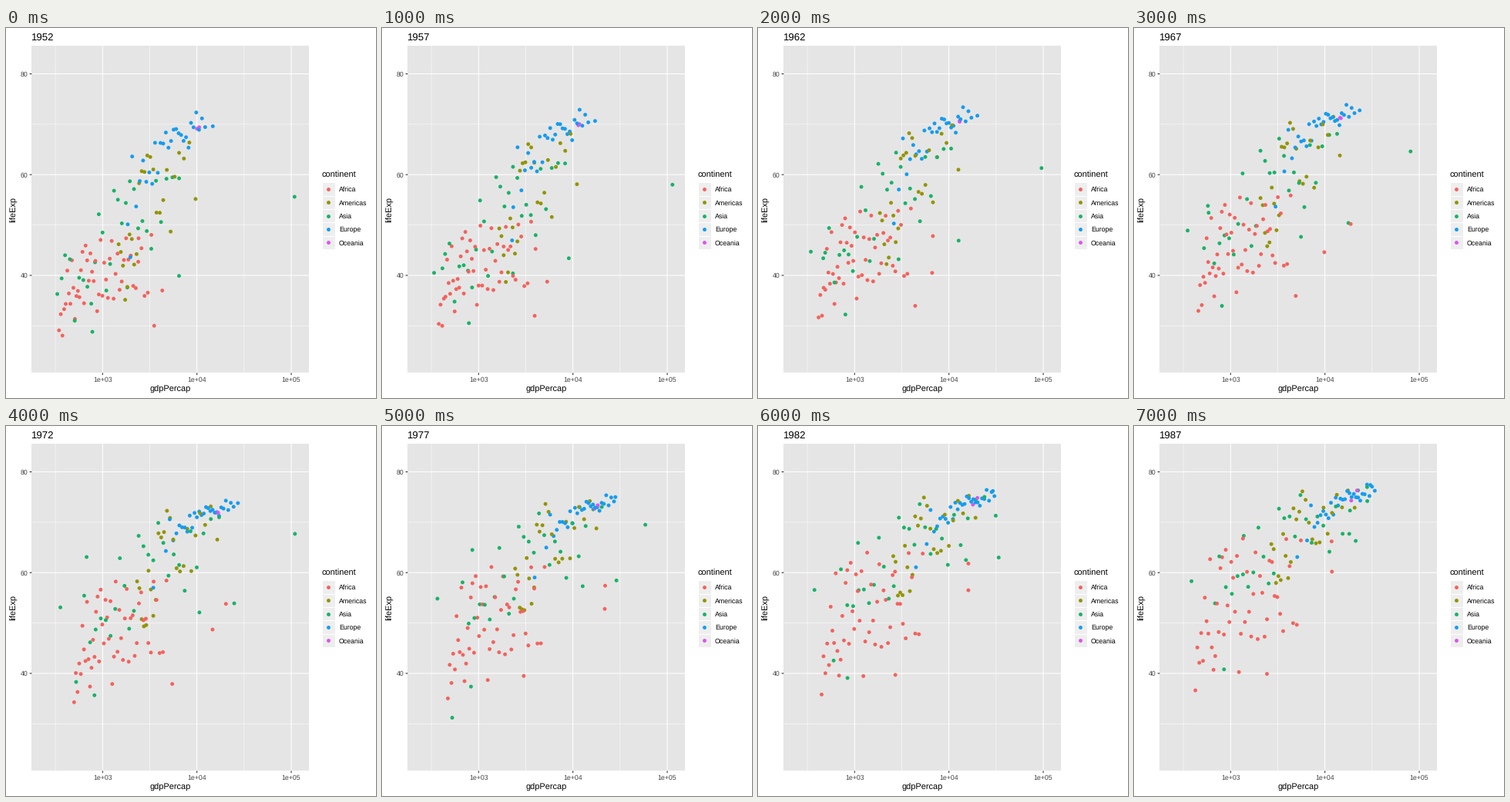
Write a matplotlib script that moves like this. It is 480 px wide and 480 px high and loops after 8000 ms.

```python
import numpy as np
import matplotlib.pyplot as plt
from matplotlib.animation import FuncAnimation
from matplotlib.patches import Rectangle

SIZE = 480
PT = 0.9  # points per pixel at 80 dpi
LEFT, RIGHT, TOP, BOTTOM = 33.4, 393.2, 23.2, 447.4
DOT = 4.9
COLORS = {"Africa": "#F3625D", "Americas": "#929400", "Asia": "#18B268",
          "Europe": "#149CF0", "Oceania": "#DC54EF"}
TREND_YEARS = (1952, 1972, 1987)
rng = np.random.default_rng(7)


def px(log_gdp):
    return LEFT + (log_gdp - 2.249) * (RIGHT - LEFT) / 2.940


def py(life):
    return TOP + (85.553 - life) * (BOTTOM - TOP) / 64.904


def spread(n):
    """Evenly filled bell-like values of unit spread, in random order."""
    q = (2 * rng.permutation(n) + 1) / n - 1
    return 1.6 * q + 0.2 * q ** 5


def skew(u, amount):
    return u + amount * (u * u - 1)


class Cloud:
    """A continent's dots, spread around a trend in log income and life."""

    def __init__(self, name, n, gdp, gdp_sd, life, life_sd, fit, lean, sag):
        self.colors = [COLORS[name]] * n
        self.trend = gdp, gdp_sd, life, life_sd
        self.rich, self.own, self.later = spread(n), spread(n), spread(n)
        self.fit, self.lean, self.sag = fit, lean, sag

    def at(self, year):
        gdp, gdp_sd, life, life_sd = (np.interp(year, TREND_YEARS, row)
                                      for row in self.trend)
        turn = 0.5 * (year - 1952) / 35
        own = np.cos(turn) * self.own + np.sin(turn) * self.later
        health = self.fit * self.rich + np.sqrt(1 - self.fit ** 2) * own
        return (gdp + gdp_sd * skew(self.rich, self.lean),
                life + life_sd * skew(health, self.sag))


class Track:
    """One far-out dot that passes through (year, income, life) points."""

    def __init__(self, name, *points):
        self.colors = [COLORS[name]]
        self.years, gdp, self.life = zip(*points)
        self.gdp = np.log10(gdp)

    def at(self, year):
        return ([np.interp(year, self.years, self.gdp)],
                [np.interp(year, self.years, self.life)])


parts = [
    Cloud("Africa", 49, (2.97, 3.13, 3.12), (0.28, 0.28, 0.32),
          (39.3, 47.6, 53.3), (5.1, 6.2, 7.6), 0.5, 0.1, 0.02),
    Cloud("Americas", 25, (3.51, 3.72, 3.80), (0.24, 0.25, 0.26),
          (53.3, 62.4, 68.1), (9.0, 7.3, 5.6), 0.7, 0.15, -0.1),
    Cloud("Asia", 26, (3.20, 3.48, 3.62), (0.34, 0.42, 0.46),
          (48.5, 59.5, 66.4), (8.4, 7.8, 6.6), 0.75, 0.05, -0.05),
    Cloud("Europe", 28, (3.70, 4.05, 4.19), (0.24, 0.21, 0.21),
          (65.0, 71.0, 73.8), (4.9, 2.1, 2.3), 0.85, -0.05, -0.15),
    Track("Africa", (1952, 2388, 42.7), (1962, 6757, 47.8), (1967, 18773, 50.2),
          (1977, 21951, 57.4), (1987, 11771, 66.2)),
    Track("Africa", (1952, 4293, 37), (1962, 6631, 40.5), (1977, 21746, 52.8),
          (1987, 11864, 60.2)),
    Track("Africa", (1952, 3521, 30), (1972, 5473, 37.9), (1977, 3009, 39.5),
          (1987, 2430, 39.9)),
    Track("Asia", (1952, 108382, 55.6), (1957, 113523, 58), (1967, 80895, 64.6),
          (1972, 109348, 67.7), (1982, 31354, 71.3), (1987, 28118, 74.2)),
    Track("Asia", (1952, 6460, 39.9), (1972, 24838, 53.9), (1982, 33693, 63),
          (1987, 21198, 66.3)),
    Track("Asia", (1952, 1828, 37.6), (1962, 2925, 43.2), (1972, 10618, 52.1),
          (1987, 18115, 67.7)),
    Track("Asia", (1952, 368, 39.4), (1967, 523, 45.4), (1977, 525, 31.2),
          (1987, 684, 53.9)),
    Track("Asia", (1952, 400, 44), (1962, 488, 44.5), (1972, 677, 63.1),
          (1987, 1379, 67.3)),
    Track("Asia", (1952, 331, 36.3), (1972, 357, 53.1), (1987, 385, 58.3)),
    Track("Asia", (1952, 779, 28.8), (1987, 852, 40.8)),
    Track("Europe", (1952, 1969, 43.6), (1972, 3451, 57), (1987, 5089, 63.1)),
    Track("Europe", (1952, 14734, 69.6), (1972, 27195, 73.8), (1987, 30282, 77.4)),
    Track("Oceania", (1952, 10040, 69.1), (1972, 16789, 71.9), (1987, 21889, 76.3)),
    Track("Oceania", (1952, 10557, 69.4), (1972, 16046, 71.9), (1987, 19007, 74.3)),
]
colors = np.concatenate([part.colors for part in parts])
# Mix the continents so that no colour always lies on top.
order = rng.permutation(len(colors))

plt.rcParams["font.family"] = "Liberation Sans"
plt.rcParams["text.hinting"] = "none"
fig = plt.figure(figsize=(6, 6), dpi=80, facecolor="white")
ax = fig.add_axes([0, 0, 1, 1])
ax.set(xlim=(0, SIZE), ylim=(SIZE, 0))
ax.axis("off")


def box(x, y, w, h, fill, edge="none"):
    ax.add_patch(Rectangle((x, y), w, h, fc=fill, ec=edge, lw=1.07 * PT, zorder=1))


def line(xs, ys, color="white", width=1.07):
    ax.plot(xs, ys, color=color, lw=width * PT, zorder=2,
            solid_capstyle="butt", snap=False)


def text(x, y, s, size, color="black", **kw):
    return ax.text(x, y, s, fontsize=size * PT, color=color, **kw)


def scatter(x, y, color):
    return ax.scatter(x, y, s=(DOT * PT) ** 2, c=color, lw=0, zorder=3)


box(LEFT, TOP, RIGHT - LEFT, BOTTOM - TOP, "#E5E5E5")
for v in (2.5, 3.5, 4.5):
    line([px(v)] * 2, [TOP, BOTTOM], width=0.53)
for v in (30, 50, 70):
    line([LEFT, RIGHT], [py(v)] * 2, width=0.53)
for v in (3, 4, 5):
    line([px(v)] * 2, [TOP, BOTTOM])
    line([px(v)] * 2, [BOTTOM, BOTTOM + 2.75], "#2B2B2B")
    text(px(v), 459, f"1e+0{v}", 8.8, "#444444", ha="center")
for v in (40, 60, 80):
    line([LEFT, RIGHT], [py(v)] * 2)
    line([LEFT - 2.75, LEFT], [py(v)] * 2, "#2B2B2B")
    text(28.4, py(v) + 3.2, v, 8.8, "#444444", ha="right")

text((LEFT + RIGHT) / 2, 472, "gdpPercap", 11, ha="center")
text(13, (TOP + BOTTOM) / 2, "lifeExp", 11, rotation=90, ha="center",
     va="baseline", rotation_mode="anchor")
title = text(LEFT, 15.6, "1952", 13.2)

text(409.5, 194, "continent", 11)
for i, (name, color) in enumerate(COLORS.items()):
    y = 209.1 + 17.28 * i
    box(409.6, y - 8.64, 17.28, 17.28, "#EEEEEE", "white")
    scatter([418.2], [y], color)
    text(432, y + 3.2, name, 8.8)

dots = scatter(np.zeros(len(order)), np.zeros(len(order)), colors[order])


def draw(frame):
    year = 1952 + 5 * frame
    title.set_text(str(year))
    gdp, life = np.hstack([part.at(year) for part in parts])
    dots.set_offsets(np.column_stack([px(gdp), py(life)])[order])
    return title, dots


anim = FuncAnimation(fig, draw, frames=8, interval=1000, init_func=lambda: draw(0),
                     repeat=True, repeat_delay=0)
plt.show()
```
